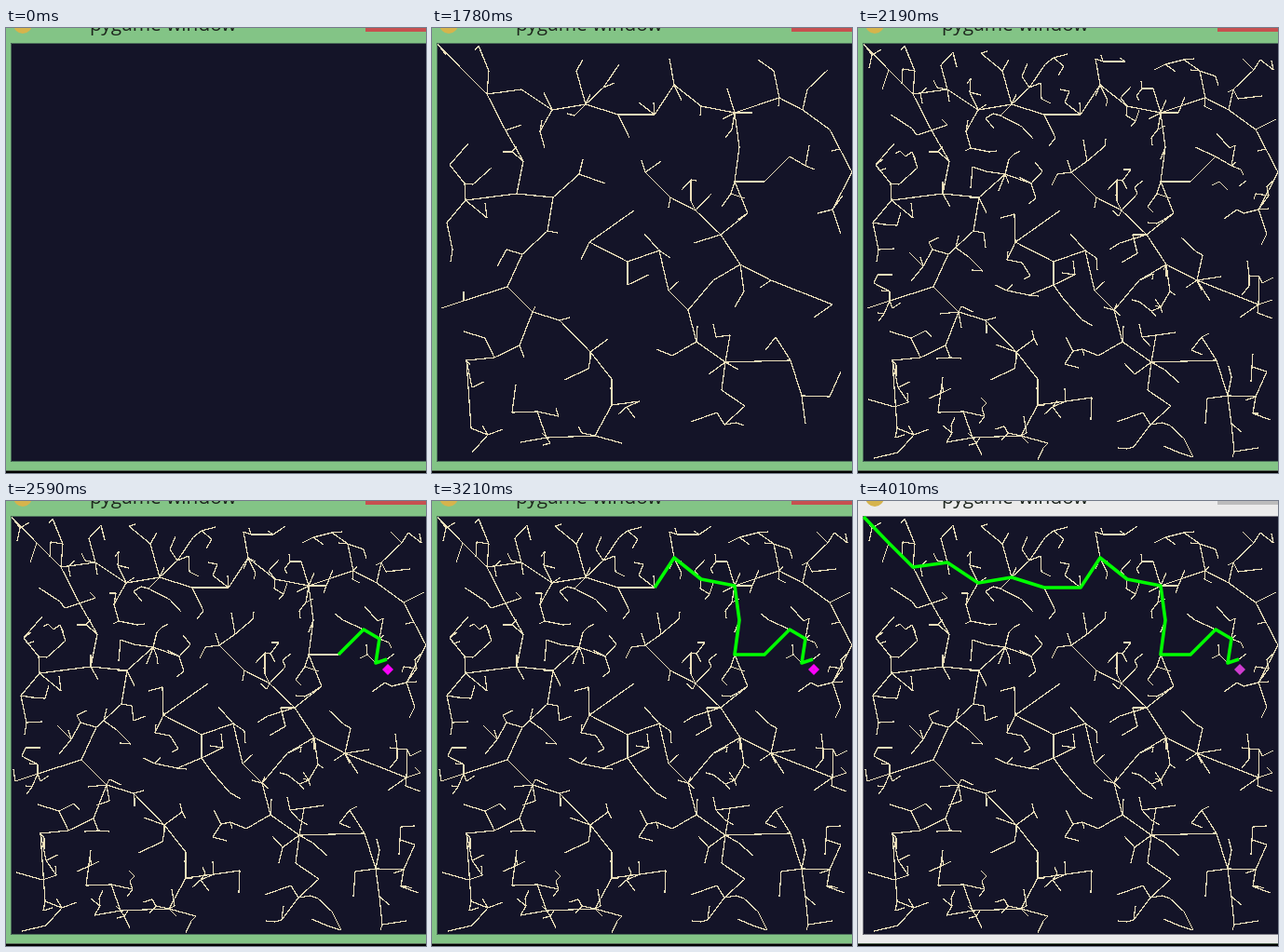
Recreate the animation shown at these times as an HTML page. Size 451 by 478 pixels, loop 5.64 s.

```html
<!DOCTYPE html>
<html lang="en">
<head>
<meta charset="utf-8">
<title>Tree search</title>
<style>
  html, body { margin: 0; width: 100%; height: 100%; overflow: hidden; background: #000; }
  svg { display: block; }
  path { fill: none; }
</style>
</head>
<body>
<svg width="451" height="478">
  <rect id="chrome" width="451" height="475"/>
  <rect y="475" width="451" height="1" fill="#586b58"/>
  <circle cx="18" cy="-4" r="10" fill="#d6b44c"/>
  <text x="90" y="3" font-family="'Open Sans', 'Noto Sans', sans-serif" font-size="20.8" fill="#1c241c">pygame window</text>
  <rect id="button" x="386" width="65" height="4"/>
  <rect id="halo" x="4" y="15" width="460" height="452" fill="#83c486"/>
  <g id="view">
    <rect x="5" y="16" width="460" height="450" fill="#141428"/>
    <path id="edge" d="M451 16.5H5.5V465.5H451"/>
    <path id="tree" stroke="#ecdfba" stroke-width="1.25"/>
    <path id="route" stroke="#0f0" stroke-width="3.6" stroke-linejoin="round"/>
    <g id="goal">
      <path id="diamond" d="M410 175l6 6l-6 6l-6-6z"/>
      <circle id="core" cx="410" cy="181" r="1.6"/>
    </g>
  </g>
</svg>
<script>
const set = (id, attrs) => {
  for (const name in attrs) document.getElementById(id).setAttribute(name, attrs[name]);
};
const toPath = points => points.length ? 'M' + points.join('L') : '';
const parse = line => line.split(' ').map(p => p.split(',').map(Number));

const route = parse('409,170 397,174 401,148 384,138 357,165 325,165 330,128 325,91 289,84 ' +
  '260,61 239,93 200,93 165,82 129,88 96,66 59,71 33,45 6,17');
const nodes = [...route];

function nearest(x, y) {
  const distance = ([a, b]) => Math.hypot(x - a, y - b);
  return nodes.reduce((best, node) => distance(node) < distance(best) ? node : best);
}

// Each branch starts at the node closest to its first point.
function addBranches(...branches) {
  return branches.map(line => {
    const points = parse(line);
    points.unshift(nearest(...points[0]));
    nodes.push(...points.slice(1));
    return toPath(points);
  }).join('');
}

let seed = 29;
const random = () => (seed = seed * 16807 % 2147483647) / 2147483647;

// Rapidly exploring tree: link each random sample to its nearest node.
function growTwigs(count) {
  const twigs = [], step = 30, gap = 6;
  while (twigs.length < count) {
    const x = 7 + random() * 443, y = 18 + random() * 446;
    const [nx, ny] = nearest(x, y);
    const distance = Math.hypot(x - nx, y - ny);
    if (distance < gap) continue;
    const k = Math.min(1, step / distance);
    const tip = [Math.round(nx + (x - nx) * k), Math.round(ny + (y - ny) * k)];
    nodes.push(tip);
    twigs.push(toPath([[nx, ny], tip]));
  }
  return twigs;
}

// The last two links of the route only exist once the goal is reached.
const trunk = toPath(route.slice(2)) + addBranches(
  '79,110 98,143 91,178 130,182 124,218 97,243 81,278 108,305 94,341',
  '36,185 16,209',
  '339,199 310,222 331,254 302,271 275,303 284,337 315,359',
  '283,196 300,178',
  '155,46', '158,157', '254,282'
) + growTwigs(9).join('');

const limbs = addBranches(
  '373,75 398,88 427,109 451,155 430,195',
  '364,271 430,297',
  '244,239 210,251',
  '229,155',
  '34,293',
  '169,230 217,196',
  '170,348 193,377 193,405 175,438 123,440',
  '37,357 42,430',
  '385,357 397,395'
);
const growth = [130, 330, 420, 440];
const twigs = growTwigs(growth[3]);

const LOOP = 5640;
const cues = [1570, 1780, 1990, 2190, 2390, 2590, 2800, 2990, 3210, 3410, 4010];
const GOAL_CUE = 5, LAST_STEP = 9, SHRINK_CUE = 10;

function treePath(cue) {
  if (cue < 2) return cue ? trunk : '';
  return trunk + limbs + twigs.slice(0, growth[Math.min(cue, GOAL_CUE) - 2]).join('');
}

// The route is traced back from the goal two links at a time.
function linkCount(cue) {
  if (cue < GOAL_CUE) return 0;
  if (cue > SHRINK_CUE) return route.length;
  return 3 + 2 * (Math.min(cue, LAST_STEP) - GOAL_CUE);
}

let shown;
function render(t) {
  const cue = cues.filter(at => t >= at).length;
  if (cue === shown) return;
  shown = cue;

  const inactive = cue >= SHRINK_CUE, shrunk = cue === SHRINK_CUE;
  const pick = (normal, small, faded) => shrunk ? small : inactive ? faded : normal;
  set('chrome', { fill: inactive ? '#ebebeb' : '#83c486' });
  set('button', { fill: pick('#c75050', '#d13c46', '#bcbcbc') });
  set('halo', { visibility: shrunk ? 'visible' : 'hidden' });
  set('view', { transform: shrunk ? 'translate(6.2 5.2) scale(.975 .978)' : '' });
  set('edge', { stroke: inactive ? '#77777f' : '#4c6f5a' });
  set('tree', {
    d: treePath(cue),
    'shape-rendering': shrunk ? 'auto' : 'crispEdges',
    'stroke-opacity': shrunk ? .8 : 1
  });
  set('route', { d: toPath(route.slice(0, linkCount(cue))) });
  set('goal', { visibility: cue >= GOAL_CUE ? 'visible' : 'hidden' });
  set('diamond', {
    style: 'fill:' + pick('#f0f', '#c0207f', '#d03cd0'),
    stroke: shrunk ? '#f4cbe6' : 'none'
  });
  set('core', { fill: pick('#d818d8', '#fff', '#c048c0') });
}

function tick() {
  render(performance.now() % LOOP);
  requestAnimationFrame(tick);
}
tick();
</script>
</body>
</html>
```
